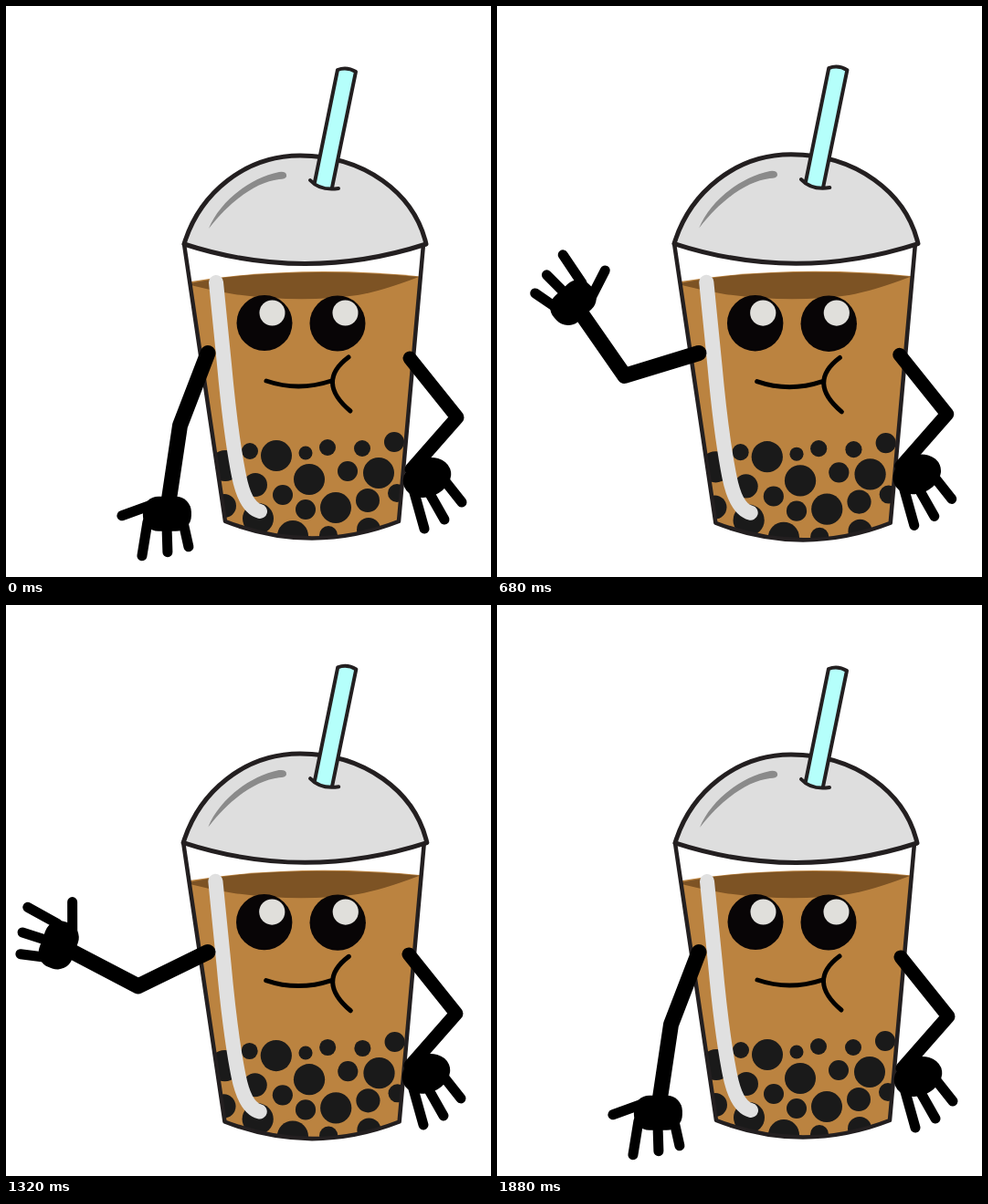
These frames come from a looping animation (531 px wide and 626 px high, 1.92 s). An HTML page:

```html
<!DOCTYPE html>
<html lang="en">
<head>
<meta charset="utf-8">
<title>Waving bubble tea</title>
<style>
  html, body { margin: 0; width: 100%; height: 100%; overflow: hidden; background: #fff; }
  svg { display: block; width: 531px; height: 626px; }
  .line { fill: none; stroke: #000; stroke-linecap: round; stroke-linejoin: round; }
  .ink { stroke: #231f20; stroke-width: 4.5; stroke-linejoin: round; stroke-linecap: round; }
</style>
</head>
<body>
<svg viewBox="0 0 531 626">
  <defs>
    <path id="shape" d="M195 261L240 565Q335 602 430 565L457 261Z"/>
    <clipPath id="inside"><use href="#shape"/></clipPath>
  </defs>

  <g id="cup">
    <g clip-path="url(#inside)">
      <path fill="#bb8340" d="M190 304Q320 282 460 297V610H190Z"/>
      <path fill="#7d5324" d="M202 304Q250 293 340 292Q400 292 452 297Q410 313 385 317Q322 326 250 316Q225 312 202 306Z"/>
      <g id="pearls" fill="#1a1a1a"></g>
    </g>
    <use href="#shape" class="ink" fill="none"/>
    <path class="line" style="stroke:#e0e0e0;stroke-width:16" d="M230 303L239 393Q246 470 255 515Q262 550 278 554"/>

    <path class="ink" style="stroke-width:5" fill="#dedede" d="M195 261C212 205 262 164 322 164C392 164 447 205 460 261Q327 304 195 261Z"/>
    <path fill="#8a8a8a" d="M222 244C233 216 265 189 299 182Q308 181 307 187Q306 190 299 190C275 193 248 211 222 244Z"/>
    <path fill="#b5fffb" d="M363 70Q373 66 383 72L357 200Q347 203 337 195Z"/>
    <path class="ink" style="stroke-width:4" fill="none" d="M338 193L363 70Q373 66 383 72L357 199M333 191Q344 203 364 200"/>

    <g fill="#080506">
      <circle cx="283" cy="347.500" r="30.500"/>
      <circle cx="363" cy="348" r="30.500"/>
    </g>
    <g fill="#e0dfdb">
      <circle cx="291.500" cy="336.500" r="14"/>
      <circle cx="371.500" cy="336.500" r="14"/>
    </g>
    <path class="line" style="stroke-width:5" d="M285 411Q320 423 356 411M375 385Q339 412 377 444"/>
  </g>

  <g id="restArm">
    <path class="line" style="stroke-width:15" d="M442 386L494 451L444 508"/>
    <ellipse cx="461" cy="517" rx="27" ry="21" transform="rotate(-22 461 517)"/>
    <path class="line" style="stroke-width:11" d="M446 530L458 573M463 533L480 563M480 520L499 544"/>
  </g>

  <path id="arm" class="line" style="stroke-width:17"/>
  <g id="hand">
    <rect x="-26" y="-20" width="53" height="38" rx="17"/>
    <path class="line" style="stroke-width:11" d="M-21 8L-27 45M0 10L1 41M18 8L24 35M-16 -11L-49 1"/>
  </g>
</svg>
<script>
const LOOP = 1920, STEP = 40;
const SHOULDER = [221, 380.5], UPPER = 85, FORE = 99;
const el = id => document.getElementById(id);

// Angles in degrees, clockwise from straight down: [time, angle]
const upperKeys = [[0, 21], [490, 73], [1180, 73], [1690, 21]];
const foreKeys = [[0, 8.5], [400, 178], [740, 142.5], [1070, 174], [1700, 8.5]];
const handKeys = [[0, 0], [400, 186], [740, 133], [1050, 174], [1700, 0]];

const pearls = [
  [240, 504, 17], [267, 488, 9], [296, 493, 17], [328, 490, 7.5], [352, 484, 9],
  [390, 485, 9], [425, 478, 11], [273, 525, 13], [332, 519, 17], [374, 510, 11],
  [408, 512, 17], [303, 536, 11], [328, 552, 11], [361, 550, 17], [396, 542, 13],
  [428, 534, 10], [239, 548, 13], [276, 562, 17], [314, 581, 17], [353, 580, 10],
  [397, 574, 13]
];
el("pearls").innerHTML = pearls
  .map(([x, y, r]) => `<circle cx="${x}" cy="${y}" r="${r}"/>`).join("");

function pose(keys, t) {
  const i = keys.findIndex(k => k[0] > t);
  if (i < 0) return keys[keys.length - 1][1];
  const [t0, a] = keys[i - 1], [t1, b] = keys[i];
  return a + (b - a) * (1 - Math.cos(Math.PI * (t - t0) / (t1 - t0))) / 2;
}

function reach([x, y], length, degrees) {
  const a = degrees * Math.PI / 180;
  return [x - length * Math.sin(a), y + length * Math.cos(a)];
}

function draw(now) {
  const t = Math.floor(now % LOOP / STEP) * STEP;
  const breath = (1 - Math.cos(2 * Math.PI * t / LOOP)) / 2;
  el("cup").setAttribute("transform",
    `translate(327 325) scale(${1 + 0.009 * breath}) translate(-327 -325)`);
  el("restArm").setAttribute("transform", `translate(${-1.5 * breath} ${-4.5 * breath})`);

  const elbow = reach(SHOULDER, UPPER, pose(upperKeys, t));
  const fore = pose(foreKeys, t);
  const palm = reach(elbow, FORE, fore);
  el("arm").setAttribute("d", `M${SHOULDER}L${elbow}L${reach(elbow, FORE - 12, fore)}`);
  el("hand").setAttribute("transform", `translate(${palm}) rotate(${pose(handKeys, t)})`);
}

const start = performance.now();
function tick() {
  draw(performance.now() - start);
  requestAnimationFrame(tick);
}
tick();
</script>
</body>
</html>
```
